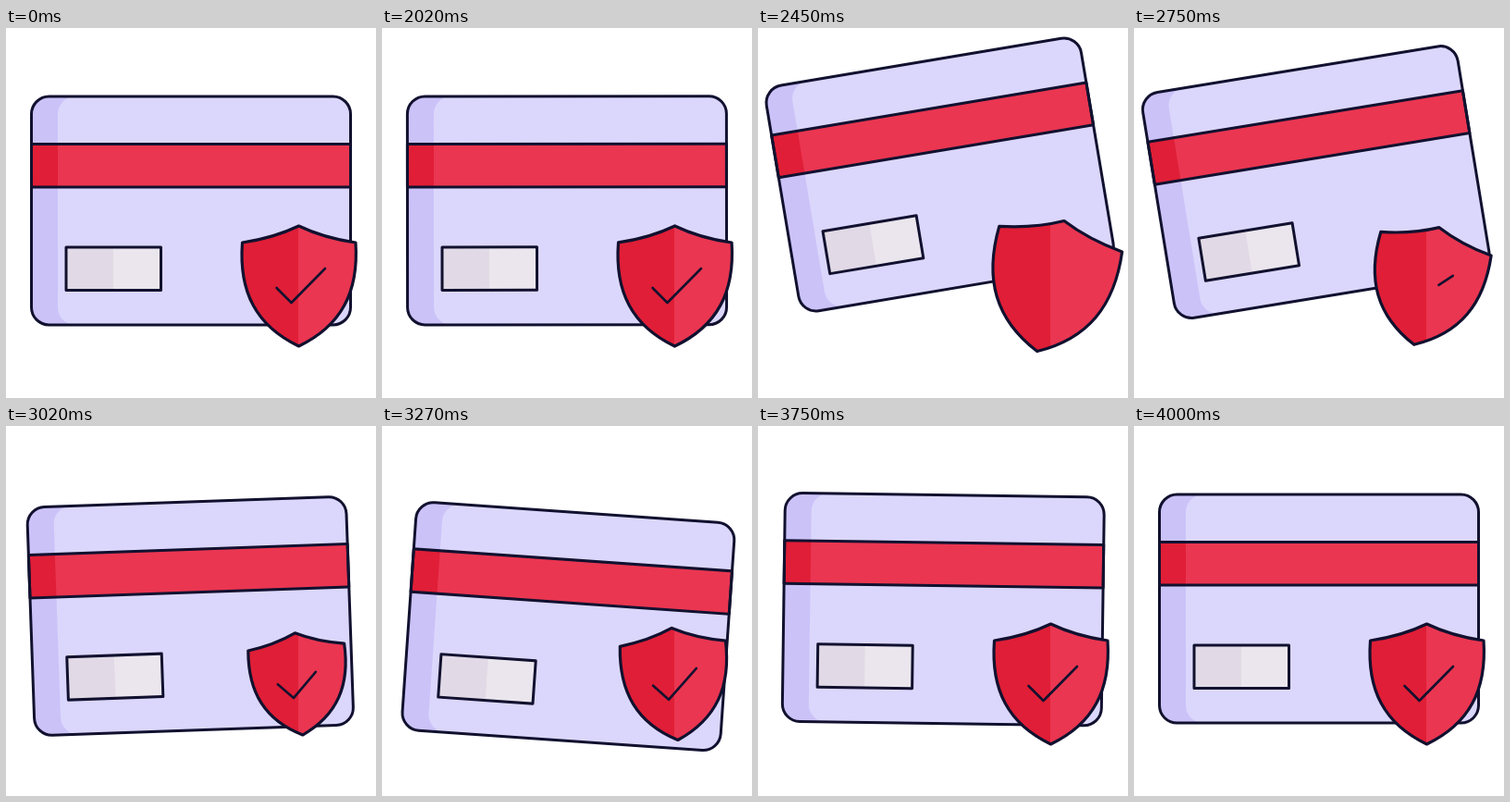
These frames come from a looping animation (400x400 px, 4.02 s). An HTML page with a canvas:

```html
<!DOCTYPE html>
<html>
<head>
<meta charset="utf-8">
<style>
html, body { margin: 0; width: 100%; height: 100%; overflow: hidden; background: #fff; }
canvas { display: block; width: 400px; height: 400px; }
</style>
</head>
<body>
<canvas id="stage" width="400" height="400"></canvas>
<script>
const ctx = document.getElementById('stage').getContext('2d');
const LOOP = 4020, INK = '#11112f', RED = '#ea3651', DARK_RED = '#e01e37';

// Smooth step from 0 to 1 between two times.
function ramp(t, from, to) {
  const u = Math.min(1, Math.max(0, (t - from) / (to - from)));
  return u * u * (3 - 2 * u);
}

// Rise to a peak, then swing back and forth, each swing smaller and quicker.
function bounce(t, peak, start, duration, tempo, damping) {
  let value = peak * ramp(t, 2000, 2520);
  for (let swing = 1; swing <= 4; swing++) {
    const next = swing < 4 ? -peak * damping : 0;
    value += (next - peak) * ramp(t, start, start + duration);
    start += duration;
    duration *= tempo;
    peak = next;
  }
  return value;
}

const card = new Path2D();
card.roundRect(-172.5, -123.5, 345, 247, 19);
const cardFace = new Path2D();
cardFace.roundRect(-144, -123.5, 330, 247, 19);
const shield = new Path2D(`M0 -64.5 Q-27 -51.5 -61 -46.5 C-65 7 -46 43.5 0 65.5
  C46 43.5 65 7 61.5 -46.5 Q27 -51.5 0 -64.5Z`);
const check = new Path2D('M28.5 -18.5 L-8 18.5 L-24 2.5');
const CHECK_LENGTH = 76;

function rect(color, x, y, w, h) {
  ctx.fillStyle = color;
  ctx.fillRect(x, y, w, h);
}

function place(x, y, degrees, size = 1) {
  ctx.translate(x, y);
  ctx.rotate(degrees * Math.PI / 180);
  ctx.scale(size, size);
}

function drawCard(t) {
  const lift = bounce(t, -41, 2597, 608, 0.64, 0.53);
  const turn = bounce(t, -10, 2660, 670, 0.433, 0.43);
  ctx.save();
  place(200 + turn * 0.35, 197.5 + lift, turn);

  ctx.save();
  ctx.clip(card);
  rect('#cbc2f8', -175, -126, 350, 252);
  ctx.fillStyle = '#dbd7fc';
  ctx.fill(cardFace);
  rect(DARK_RED, -175, -72, 350, 46.5);
  rect(RED, -144, -72, 320, 46.5);
  ctx.restore();

  rect('#e1d9e5', -135, 39.5, 102.5, 46.5);
  rect('#ebe6ed', -84, 39.5, 51.5, 46.5);
  ctx.strokeRect(-135, 39.5, 102.5, 46.5);
  ctx.strokeRect(-172.5, -72, 345, 46.5);
  ctx.stroke(card);
  ctx.restore();
}

function drawShield(t) {
  const grow = ramp(t, 2000, 2520), settle = ramp(t, 3020, 3490);
  const size = 1 + 0.113 * grow - 0.263 * ramp(t, 2520, 3020) + 0.15 * settle;
  const turn = 12.3 * grow - 18 * ramp(t, 2730, 3080) + 5.7 * ramp(t, 3080, 3490);
  const x = 316.5, y = 278.5;

  // The two-tone split stays upright while the outline turns.
  ctx.save();
  place(x, y, turn, size);
  ctx.clip(shield);
  ctx.resetTransform();
  rect(DARK_RED, 200, 180, 200, 200);
  rect(RED, 316, 180, 84, 200);
  ctx.restore();

  ctx.save();
  place(x, y, turn, size);
  ctx.lineWidth = 3.2 / size;
  ctx.stroke(shield);
  ctx.restore();

  // The check is wiped away, then redrawn from its long end.
  const drawn = ramp(t, 2620, 2980);
  const end = CHECK_LENGTH * (1 - ramp(t, 2020, 2400) + drawn);
  const shift = drawn - settle, begin = 15 * shift;
  if (end <= begin) return;
  ctx.save();
  place(x + shift, y - 3.5 * shift, turn);
  ctx.setLineDash([end - begin, 200]);
  ctx.lineDashOffset = -begin;
  ctx.lineWidth = 2.6;
  ctx.stroke(check);
  ctx.restore();
}

function draw(t) {
  rect('#fff', 0, 0, 400, 400);
  ctx.strokeStyle = INK;
  ctx.lineWidth = 3;
  ctx.lineCap = ctx.lineJoin = 'round';
  drawCard(t);
  drawShield(t);
}

const start = performance.now();
function tick() {
  draw((performance.now() - start) % LOOP);
  requestAnimationFrame(tick);
}
tick();
</script>
</body>
</html>
```
